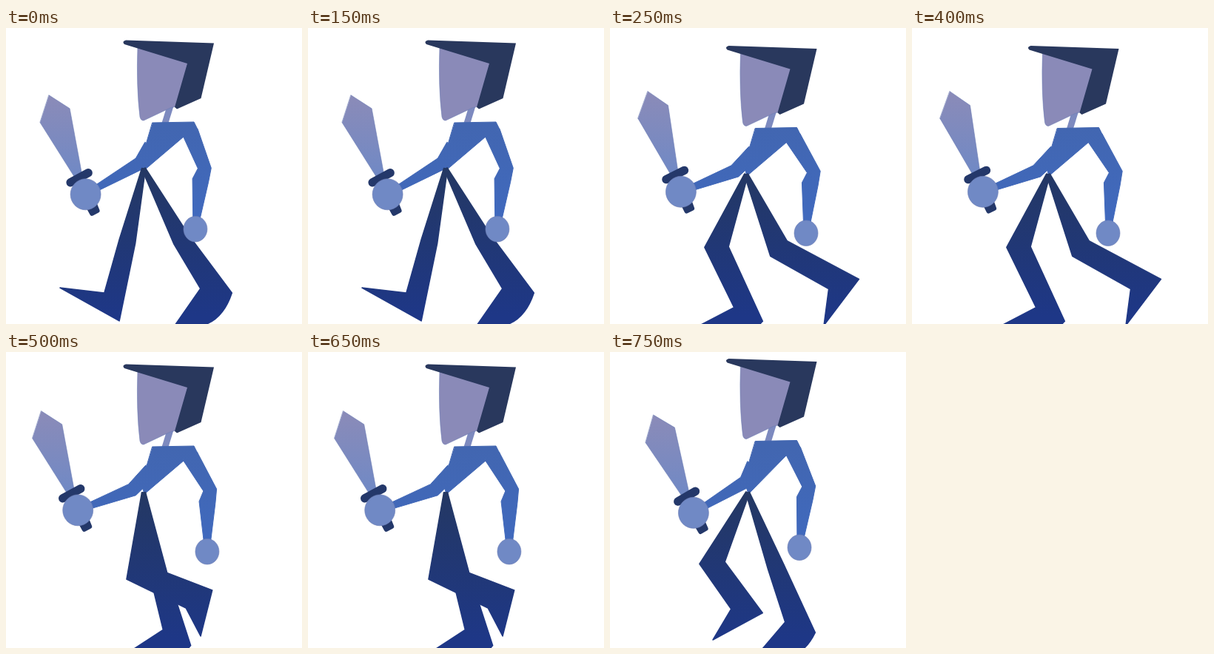
Recreate the animation shown at these times as an HTML page. Size 400 px wide and 400 px high, loop 1 s.

```html
<!DOCTYPE html>
<html lang="en">
<head>
<meta charset="utf-8">
<title>Walking swordsman</title>
<style>
  html, body { margin: 0; width: 100%; height: 100%; overflow: hidden; background: #fff; }
  svg { display: block; width: 100%; height: 100%; }
  path { stroke-linejoin: round; stroke-linecap: round; }
  .leg { fill: url(#legFill); stroke: url(#legFill); stroke-width: 1.5; }
  .cloth { fill: url(#clothFill); stroke: url(#clothFill); }
  .dark { fill: #24386a; stroke: #24386a; }
  .skin { stroke: #6c7cb4; stroke-width: .6; }
</style>
</head>
<body>
<svg viewBox="0 0 400 400">
  <defs>
    <linearGradient id="legFill" gradientUnits="userSpaceOnUse" x1="0" y1="190" x2="0" y2="390">
      <stop stop-color="#243863"/><stop offset="1" stop-color="#1e3787"/>
    </linearGradient>
    <linearGradient id="clothFill" gradientUnits="userSpaceOnUse" x1="0" y1="125" x2="0" y2="250">
      <stop stop-color="#4266b0"/><stop offset="1" stop-color="#4069bd"/>
    </linearGradient>
    <linearGradient id="bladeFill" gradientUnits="userSpaceOnUse" x1="0" y1="0" x2="0" y2="110">
      <stop stop-color="#8b8bb8"/><stop offset="1" stop-color="#7089c5"/>
    </linearGradient>
  </defs>

  <g id="head">
    <path fill="#7d8abf" d="M217 107 227 104 219 130H210Z"/>
    <path class="skin" fill="#8a8ab8" d="M178 25 246 47 230 106 222 108 186 125Q182 125 181 120Q176 80 178 25Z"/>
    <path fill="#29385d" d="M160 22Q156 18 162 16.5L281 20.5 263.5 95 231 109.5 228 107 245 48Z"/>
  </g>
  <path id="torso" class="cloth"/>
  <path id="swordArm" class="cloth"/>
  <path id="freeArm" class="cloth"/>
  <path id="swing" class="leg"/>
  <path id="planted" class="leg"/>
  <g id="swordHand">
    <g transform="translate(-49.5 -134)">
      <path class="skin" fill="url(#bladeFill)" d="M0 0 28 18 44 104 34 110-12 37Z"/>
      <path class="dark" stroke-width="11.5" d="M29 118 53 105"/>
      <path class="dark" stroke-width="6" d="M46 138 57 135 65.5 156 58 160Z"/>
    </g>
    <ellipse class="skin" fill="#7089c5" rx="20.5" ry="21"/>
  </g>
  <ellipse id="freeHand" class="skin" fill="#7089c5" rx="16" ry="17.3"/>
</svg>

<script>
const STEP = 250;

// Knee, ankle and toe of each leg at the four steps of the walk.
const strides = [
  { planted: [[237, 286], [284, 355], [228, 402]], swing: [[164, 288], [143, 377], [73, 351]] },
  { planted: [[144, 296], [187, 387], [119, 403]], swing: [[228, 298], [316, 346], [289, 402]] },
  { planted: [[206, 300], [231, 386], [173, 401]], swing: [[178, 298], [261, 334], [263, 384]] },
  { planted: [[224, 290], [257, 372], [206, 401]], swing: [[138, 285], [185, 350], [139, 389]] }
];

const add = ([ax, ay], [bx, by], k = 1) => [ax + bx * k, ay + by * k];
const lerp = (a, b, t) => [a[0] + (b[0] - a[0]) * t, a[1] + (b[1] - a[1]) * t];
const unit = ([x, y]) => { const len = Math.hypot(x, y); return [x / len, y / len]; };
const direction = (a, b) => unit(add(b, a, -1));
const polygon = points => `M${points.join(" ")}Z`;

// Tapered outline around a chain of joints; sole rounds the edge before the tip.
function limb(joints, widths, sole = 0) {
  const sides = joints.map((joint, i) => {
    const before = joints[i - 1] || joint, after = joints[i + 1] || joint;
    const into = i ? direction(before, joint) : direction(joint, after);
    const out = after === joint ? into : direction(joint, after);
    const [x, y] = unit(add(into, out));
    return [-1, 1].map(side => add(joint, [y, -x], side * widths[i] / 2));
  });
  const front = sides.map(pair => pair[0]);
  const back = sides.map(pair => pair[1]).reverse();
  const [x, y] = direction(back[1], back[0]);
  const control = add(lerp(back[0], back[1], .5), [y, -x], sole);
  return `M${front.join(" ")}L${back[0]}Q${control} ${back[1]}L${back.slice(2).join(" ")}Z`;
}

function leg(hip, [knee, ankle, toe], sole) {
  const [ax, ay] = direction(hip, knee), [bx, by] = direction(knee, ankle);
  const bend = Math.abs(ax * by - ay * bx);
  return limb([hip, knee, ankle, toe], [5, 22 + 14 * bend, 43, 0], sole);
}

const el = id => document.getElementById(id);
const setPath = (id, d) => el(id).setAttribute("d", d);
const place = (id, [x, y], angle = 0) =>
  el(id).setAttribute("transform", `translate(${x} ${y}) rotate(${angle})`);

function draw(time) {
  const step = Math.floor(time / STEP) % strides.length;
  const phase = step * Math.PI / 2;
  const cos = Math.cos(phase), sin = Math.sin(phase);
  const wave = (mean, c, s, twice = 0) => mean + c * cos + s * sin + twice * Math.cos(2 * phase);

  const bob = [-1.5 * Math.abs(sin), 7.5 * sin];
  const hip = [186 - 2 * Math.max(0, sin), 190 + 8 * Math.max(0, sin)];
  const onBody = (x, y) => add([x, y], bob);

  const swordElbow = [wave(176, 5.5, -7.2), wave(184.4, -1.8, 9)];
  const swordHand = [wave(103.4, 5.2, -8.5, -1), wave(219.3, 5.5, 2)];
  const freeElbow = [wave(272, -3.7, 3.3), wave(188, 1.5, 6.5)];
  const freeHand = [wave(262.2, -8, 4.5, 1.7), wave(270.7, 1, 6.5)];
  const forearm = add(lerp(freeElbow, freeHand, .2), [-3, 0]);

  setPath("torso", polygon([
    onBody(198, 128), onBody(254, 127), onBody(259, 137), onBody(240, 147),
    add(hip, [1, 2]), add(hip, [-2, -8]), onBody(190, 154)
  ]));
  setPath("swordArm", limb([onBody(196, 160), swordElbow, swordHand], [20, 18, 6]));
  setPath("freeArm", limb([onBody(249, 141), freeElbow, forearm, freeHand], [22, 18, 22, 6]));
  setPath("swing", leg(hip, strides[step].swing, 0));
  setPath("planted", leg(hip, strides[step].planted, 40));
  place("head", bob);
  place("swordHand", swordHand, 2 * sin);
  place("freeHand", freeHand);
}

const start = performance.now();
function tick() {
  draw(performance.now() - start);
  requestAnimationFrame(tick);
}
tick();
</script>
</body>
</html>
```
